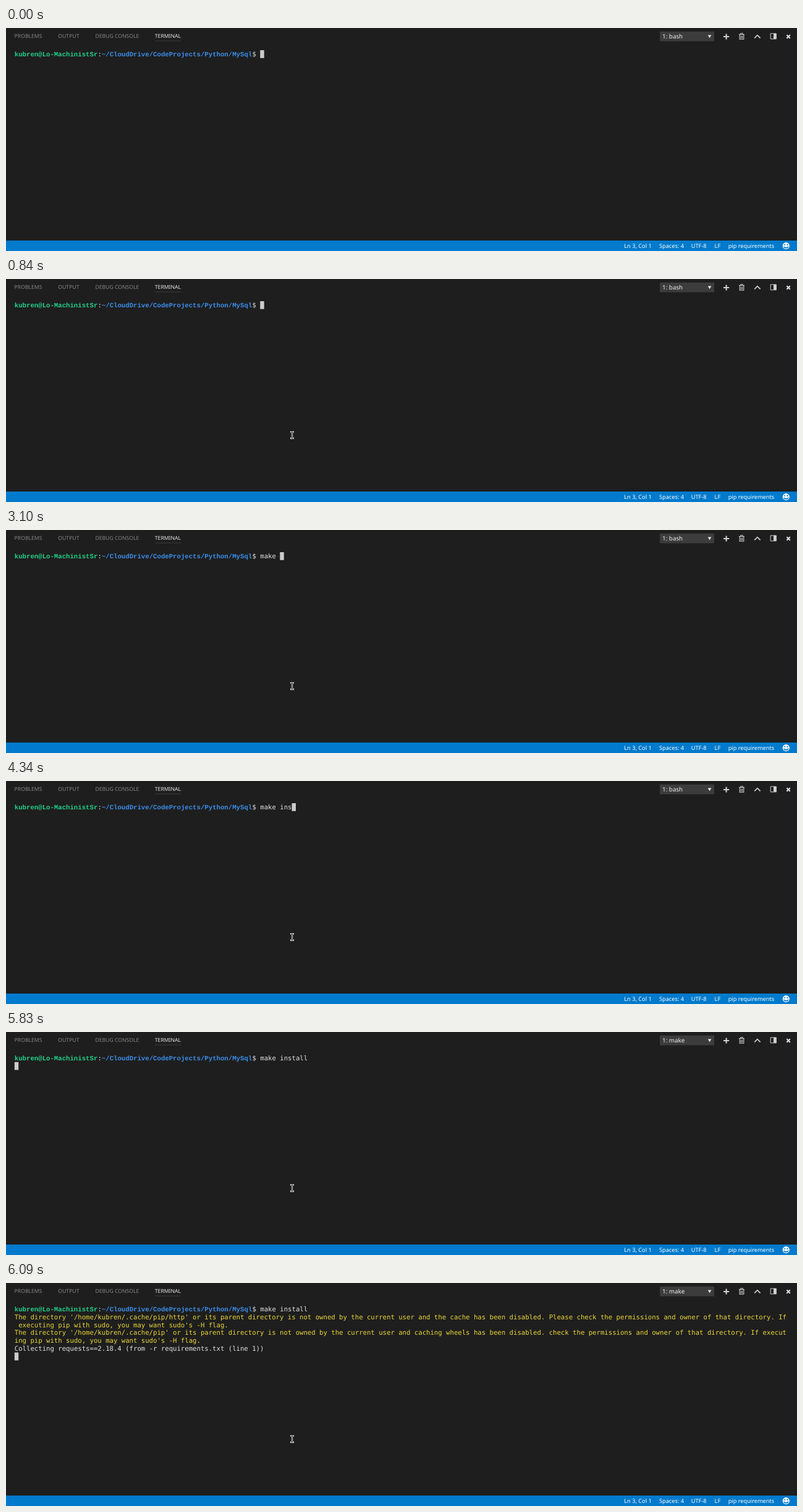
An HTML page that plays this animation: 1280 px wide and 362 px high, repeating every 8000 ms.

```html
<!DOCTYPE html>
<html lang="en">
<head>
<meta charset="utf-8">
<title>Terminal</title>
<style>
  html, body { margin: 0; width: 100%; height: 100%; overflow: hidden; background: #1e1e1e; }
  svg { display: block; width: 1280px; height: 362px; }
  text { white-space: pre; text-rendering: geometricPrecision; }
  .ui { font-family: "Noto Sans", "Open Sans", sans-serif; }
  .tab { font-size: 8.65px; fill: #868686; }
  .status { font-size: 9.2px; fill: #fff; }
  .mono { font: 10.65px "DejaVu Sans Mono", monospace; }
  .bold { font: bold 10.685px "Liberation Mono", monospace; }
</style>
</head>
<body>
<svg id="stage" viewBox="0 0 1280 362"></svg>
<script>
const LOOP = 8000;
const LEFT = 13.8, TOP = 36, CELL = 6.411, ROW = 12.8, COLUMNS = 195;
const USER = "kubren", HOST = "Lo-MachinistSr", FOLDER = "~/CloudDrive/CodeProjects/Python/MySql";
const COMMAND = "make install";
const KEY_TIMES = [2750, 2890, 2960, 3030, 3100, 3790, 3850, 4340, 4890, 5000, 5330, 5440];
const ENTER = 5740, RENAME = 5830, WARN = 6040, COLLECT = 6090;
const WHITE = "#e2e2e2", YELLOW = "#ecd83a", GREEN = "#23d18b", BLUE = "#3b8eea";

const cellX = column => LEFT + column * CELL;
const rowY = row => TOP + row * ROW;

function label(cls, x, y, text, extra = "") {
  return `<text class="${cls}" x="${x}" y="${y}" ${extra}>${text}</text>`;
}

function cells(row, column, text, color = WHITE, cls = "mono", id = "") {
  return label(cls, cellX(column), rowY(row) + 9.9, text, `id="${id}" fill="${color}"`);
}

function wrap(text) {
  const rows = [];
  for (let i = 0; i < text.length; i += COLUMNS) rows.push(text.slice(i, i + COLUMNS));
  return rows;
}

function warning(path, subject, request) {
  return wrap(`The directory '/home/${USER}/.cache/${path}' or its parent directory is not owned by the ` +
    `current user and ${subject} has been disabled. ${request} the permissions and owner of that directory. ` +
    `If executing pip with sudo, you may want sudo's -H flag.`);
}

const login = `${USER}@${HOST}`;
const folderColumn = login.length + 1;
const dollarColumn = folderColumn + FOLDER.length;
const inputColumn = dollarColumn + 2;
const warnings = [
  ...warning("pip/http", "the cache", "Please check"),
  ...warning("pip", "caching wheels", "check")
];

const tabs = [[13.6, "PROBLEMS"], [84.3, "OUTPUT"], [144.4, "DEBUG CONSOLE"]]
  .map(([x, text]) => label("ui tab", x, 16.1, text)).join("");

const statusItems = [[1000.3, "Ln 3, Col 1"], [1057, "Spaces: 4"], [1108.8, "UTF-8"], [1146.6, "LF"], [1168.7, "pip requirements"]]
  .map(([x, text]) => label("ui status", x, 357, text)).join("");

const icons = `
  <g fill="none" stroke="#d0d0d0">
    <path d="M1161 14h9.2M1165.6 9.4v9.2" stroke-width="2.1"/>
    <path d="M1186 10.5h9M1188.8 10v-1.3h3.4v1.3M1187.2 11v7.3h6.6v-7.3M1189.4 12.5v4.5M1191.6 12.5v4.5" stroke-width="1.1"/>
    <path d="M1211.2 16.4l4.7-4.7 4.7 4.7" stroke-width="1.7"/>
    <path d="M1237.2 9h9.2v8.8h-9.2z" stroke-width="1"/>
    <path d="M1263.4 11.3l5.4 5.4M1268.8 11.3l-5.4 5.4" stroke="#e4e4e4" stroke-width="2"/>
  </g>
  <path d="M1242 9h4.4v8.8h-4.4z" fill="#d0d0d0"/>`;

const smiley = `
  <circle cx="1262.3" cy="353.6" r="5.6" fill="#fff"/>
  <g fill="#007acc"><circle cx="1260.2" cy="351.8" r="1.1"/><circle cx="1264.4" cy="351.8" r="1.1"/>
  <path d="M1258.3 354.4h1.1a3 2.2 0 0 0 5.8 0h1.1a4 3.4 0 0 1-8 0z"/></g>`;

const beam = "M-1.8-5.2Q0-5.2 0-4V4Q0 5.2-1.8 5.2M1.8-5.2Q0-5.2 0-4M0 4Q0 5.2 1.8 5.2";

document.getElementById("stage").innerHTML = `
  <rect width="1280" height="362" fill="#1e1e1e"/>
  ${tabs}
  ${label("ui tab", 240.8, 16.1, "TERMINAL", 'style="fill:#e7e7e7"')}
  <rect x="241" y="20.6" width="42.8" height=".8" fill="#444"/>
  <rect x="1058" y="5.7" width="88" height="15.8" fill="#3c3c3c"/>
  ${label("ui", 1062, 17.2, "", 'id="shell" font-size="9.85" fill="#f0f0f0"')}
  <path d="M1135.8 11.4h5.6l-2.8 4.8z" fill="#f0f0f0"/>
  ${icons}
  ${cells(0, 0, login, GREEN, "bold")}
  ${cells(0, login.length, ":")}
  ${cells(0, folderColumn, FOLDER, BLUE, "bold")}
  ${cells(0, dollarColumn, "$")}
  ${cells(0, inputColumn, "", WHITE, "mono", "input")}
  <g id="warnings">${warnings.map((text, i) => cells(i + 1, 0, text, YELLOW)).join("")}</g>
  <g id="collecting">${cells(warnings.length + 1, 0, "Collecting requests==2.18.4 (from -r requirements.txt (line 1))")}</g>
  <rect id="caret" width="${CELL}" height="${ROW}" fill="#ccc"/>
  <rect y="345" width="1280" height="17" fill="#007acc"/>
  ${statusItems}
  ${smiley}
  <g id="mouse" fill="none">
    <path d="${beam}" stroke="#f0f0f0" stroke-width="2.3" stroke-linecap="square"/>
    <path d="${beam}" stroke="#151515" stroke-width=".9"/>
  </g>`;

const part = Object.fromEntries(["shell", "input", "warnings", "collecting", "caret", "mouse"]
  .map(id => [id, document.getElementById(id)]));

const show = (element, visible) => element.setAttribute("visibility", visible ? "visible" : "hidden");
const mix = (a, b, p) => a + (b - a) * p;

// Stepped progress, as the pointer is sampled at a low rate.
function progress(t, start, interval, first, count) {
  const step = Math.floor((t - start) / interval + 1e-6) + first;
  const p = Math.max(0, Math.min(1, step / count));
  return p * p * (3 - 2 * p);
}

function mousePosition(t) {
  if (t < 640) {
    const p = progress(t, 220, 140 / 3, 0, 3);
    return [mix(1172.5, 712, p), mix(308.5, 164.5, p)];
  }
  const p = progress(t, 640, 40, 1, 6);
  return [mix(712, 463, p), mix(164.5, 253.3, p)];
}

function caretCell(t, typed) {
  if (t < ENTER) return [0, inputColumn + typed];
  if (t < WARN) return [1, 0];
  return [warnings.length + (t < COLLECT ? 1 : 2), 0];
}

function draw(t) {
  const typed = KEY_TIMES.filter(time => time <= t).length;
  part.input.textContent = COMMAND.slice(0, typed);
  part.shell.textContent = t < RENAME ? "1: bash" : "1: make";
  show(part.warnings, t >= WARN);
  show(part.collecting, t >= COLLECT);
  const [row, column] = caretCell(t, typed);
  part.caret.setAttribute("x", cellX(column));
  part.caret.setAttribute("y", rowY(row));
  show(part.mouse, t >= 220);
  part.mouse.setAttribute("transform", `translate(${mousePosition(t)})`);
}

const begin = performance.now();
function tick() {
  draw((performance.now() - begin) % LOOP);
  requestAnimationFrame(tick);
}
tick();
</script>
</body>
</html>
```
